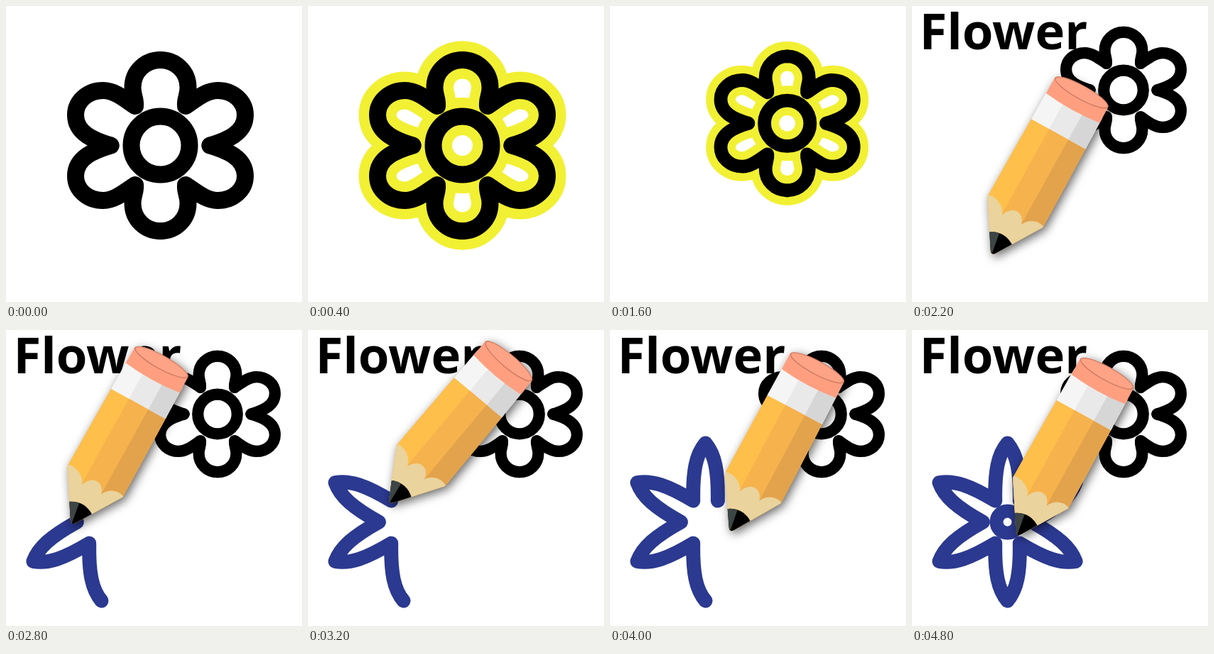
An HTML page that plays this animation: 417 by 417 pixels, repeating every 6.8 s.

```html
<!DOCTYPE html>
<html lang="en">
<head>
<meta charset="utf-8">
<title>Flower</title>
<style>
  html, body { margin: 0; width: 100%; height: 100%; overflow: hidden; background: #fff; }
  svg { display: block; width: 100vw; height: 100vh; }
  text { font: bold 70.600px "Open Sans", "Noto Sans", sans-serif; }
  .line { fill: none; stroke-linecap: round; stroke-linejoin: round; }
  #pencil { filter: drop-shadow(3px 4px 7px rgba(0, 0, 0, .6)); }
</style>
</head>
<body>
<svg viewBox="0 0 417 417">
  <defs>
    <!-- One quarter of the outline, mirrored into four -->
    <path id="quarter" d="M0-120.500C21.500-120.500 39-104 39-81.500C39-70 34.500-66 35.500-55.500C51-66 65-77.500 80.500-77.500C103-77.500 119.500-62 119.500-43C119.500-17 93-7 70 0"/>
    <g id="bloom">
      <use href="#quarter"/>
      <use href="#quarter" transform="scale(-1 1)"/>
      <use href="#quarter" transform="scale(1 -1)"/>
      <use href="#quarter" transform="scale(-1 -1)"/>
      <circle r="41"/>
    </g>
    <clipPath id="outline">
      <path d="M-4-5Q0 1 4-5L45-70L43-262A43 10 0 0 0-43-262L-45-70z"/>
    </clipPath>
  </defs>

  <g id="flower" class="line">
    <use id="glow" href="#bloom"/>
    <use href="#bloom" stroke="#000" stroke-width="24"/>
  </g>

  <text id="word" x="10.500" y="60.500">Flower</text>

  <g class="line" stroke="#2b3990" stroke-width="20">
    <path id="sketch" pathLength="12"/>
    <circle id="ring" r="15.500" stroke-width="19"/>
  </g>

  <g id="pencil">
    <g id="body" clip-path="url(#outline)">
      <path fill="#f6b24d" d="M-45 0V-200H45V0z"/>
      <path fill="#ffbf4a" d="M-45 0V-200H-15V0z"/>
      <path fill="#e3a34c" d="M16 0V-200H45V0z"/>
      <path fill="#ead39c" d="M-45 0V-72C-38-75-20-72-14-57C-8-76 12-76 16-58C22-72 38-75 45-70V0z"/>
      <path fill="#000" d="M0 2L-20-26Q0-40 20-26z"/>
      <path fill="#3d4545" d="M0 0L-20-26Q-12-32-5-32z"/>
      <path fill="#e9e9e9" d="M-45-195V-245H45V-195z"/>
      <path fill="#f5f5f5" d="M-45-195V-245H-15V-195z"/>
      <path fill="#d6d6d6" d="M16-195V-245H45V-195z"/>
      <path fill="#ff9f80" d="M-45-237V-275H45V-237Q0-231-45-237z"/>
      <ellipse cy="-262" rx="42" ry="9.500" fill="#ffa386" stroke="#cf7d64" stroke-width="1.500"/>
    </g>
  </g>
</svg>
<script>
const STEP = 200, LOOP = 6800, LAST = 24;
const HEART = { x: 134.5, y: 270.5 };
const GLOW = [["none", 0], ["#f9f698", 44], ["#f2f033", 53]];

// Key values as [step, value], joined by straight lines
const DRAWN = [[12, .45], [13, 2], [18, 7], [20, 7], [22, 11], [23, 12]];
const TILT = [[14, 29], [15, 60], [16, 40], [17, 66], [18, 50], [20, 28], [21, 47], [22, 29]];
const NIB_X = [[14, -8], [18, 2], [20, 17], [21, 2]];
const NIB_Y = [[18, 4], [20, 44], [21, 1], [22, 8]];

const $ = id => document.getElementById(id);
const clamp = v => Math.max(0, Math.min(1, v));
const mix = (a, b, p) => a + (b - a) * p;

function set(el, attrs) {
  for (const key in attrs) el.setAttribute(key, attrs[key]);
}

function keyed(keys, t) {
  const next = keys.findIndex(k => k[0] > t);
  if (next < 0) return keys[keys.length - 1][1];
  if (next === 0) return keys[0][1];
  const [t0, a] = keys[next - 1], [t1, b] = keys[next];
  return mix(a, b, (t - t0) / (t1 - t0));
}

// Six petals of two mirrored halves, clockwise from the bottom tip
function sketchPath() {
  const half = [[0, 111], [13.5, 95], [18, 72], [17.3, 30]];
  const spot = (turn, side, [x, y]) => {
    const c = Math.cos(turn), s = Math.sin(turn);
    const px = HEART.x + side * x * c + y * s;
    const py = HEART.y + side * x * s - y * c;
    return px.toFixed(1) + " " + py.toFixed(1);
  };
  let d = "M" + spot(Math.PI, 1, half[0]);
  for (let i = 0; i < 12; i++) {
    const turn = Math.PI * (1 + Math.ceil(i / 2) / 3);
    const inward = i % 2 === 0;
    const points = inward ? half.slice(1) : half.slice(0, 3).reverse();
    d += "C" + points.map(p => spot(turn, inward ? 1 : -1, p)).join(" ");
  }
  return d;
}

function drawFlower(step) {
  const p = clamp((step - 7) * .4);
  const x = mix(217.5, 298, p), y = mix(196.5, 118.5, p);
  const scale = mix(1, .677, p ** .44);
  set($("flower"), { transform: `translate(${x} ${y}) scale(${scale})` });

  const level = step < 8 ? 2 - Math.abs(step % 4 - 2) : Math.max(0, 10 - step);
  const [stroke, width] = GLOW[level];
  set($("glow"), { stroke, "stroke-width": width });
}

function drawSketch(step) {
  const sketch = $("sketch"), drawn = keyed(DRAWN, step);
  set(sketch, {
    "stroke-dasharray": `${drawn} 24`,
    visibility: step < 12 ? "hidden" : "visible"
  });
  set($("ring"), { visibility: step < LAST ? "hidden" : "visible" });

  // The nib follows the line, then goes to the heart
  let x = HEART.x + 13, y = HEART.y + 20;
  if (drawn < 12) {
    const end = sketch.getPointAtLength(sketch.getTotalLength() * drawn / 12);
    x = end.x + keyed(NIB_X, step);
    y = end.y + keyed(NIB_Y, step);
  }
  set($("body"), { transform: `translate(${x} ${y}) rotate(${keyed(TILT, step)})` });
}

function draw(step) {
  drawFlower(step);
  drawSketch(step);
  set($("word"), { opacity: clamp((step - 8) / 3) });
  set($("pencil"), { opacity: clamp((step - 9) / 2) });
}

set($("sketch"), { d: sketchPath() });
set($("ring"), { cx: HEART.x, cy: HEART.y });

const start = performance.now();
let shown = -1;

function tick() {
  const time = (performance.now() - start) % LOOP;
  const step = Math.min(LAST, Math.floor(time / STEP));
  if (step !== shown) draw(shown = step);
  requestAnimationFrame(tick);
}
tick();
</script>
</body>
</html>
```
